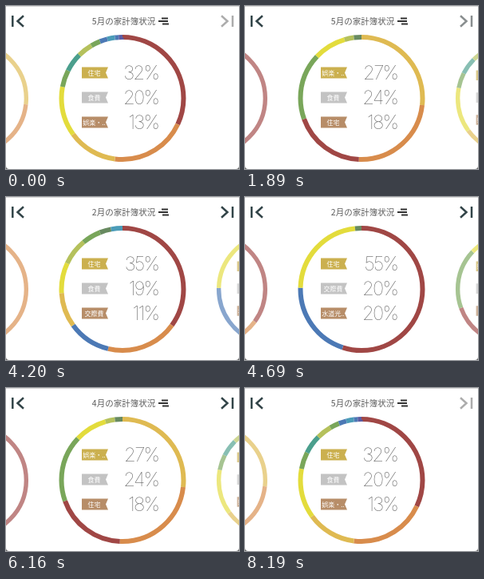
Recreate the animation shown at these times as an HTML page. Size 292 px wide and 204 px high, loop 8.61 s.

```html
<!DOCTYPE html>
<html lang="ja">
<head>
<meta charset="utf-8">
<title>家計簿状況</title>
<style>
  html, body { margin: 0; width: 100%; height: 100%; overflow: hidden; background: #fff; }
  svg { display: block; width: 100vw; height: 100vh; }
  .title { font: 400 10.5px "Noto Sans CJK JP", "Noto Sans CJK", sans-serif; fill: #5c5c5c; text-anchor: middle; }
  .tag { font: 400 8px "Noto Sans CJK JP", "Noto Sans CJK", sans-serif; fill: #fff; text-anchor: middle; }
  .pct { font: 100 24px Inter, sans-serif; letter-spacing: -1.8px; fill: #505050; text-anchor: end; }
  .line { fill: none; stroke-width: 2.5; }
</style>
</head>
<body>
<svg id="stage" viewBox="0 0 292 204" preserveAspectRatio="none"></svg>
<script>
const NS = 'http://www.w3.org/2000/svg';
const stage = document.getElementById('stage');
const LOOP = 8610, STEP = 70, MOVE = 400, GAP = 189.5;
const CX = 146, CY = 115.5, R = 76.5;
const DARK = [50, 68, 72], GREY = [172, 172, 172];

const C = {
  red: '#a04745', orange: '#d88c4c', gold: '#dfba52', yellow: '#e3dc3c', green: '#79a65a',
  teal: '#4b9f8d', lime: '#b5c15c', blue: '#4c79b5', sky: '#4b9cb8', moss: '#688a60', violet: '#5b5ca3'
};

// Each month: three top rows and ring segments as [colour, end percent].
const pages = [
  { rows: [], ring: [['orange', 60], ['red', 100]] },
  { rows: [['住宅', 35], ['食費', 19], ['交際費', 11]],
    ring: [['red', 35], ['orange', 53.8], ['blue', 65], ['gold', 74], ['yellow', 82], ['lime', 89],
           ['green', 94], ['moss', 97], ['sky', 100]] },
  { rows: [['住宅', 55], ['交際費', 20], ['水道光..', 20]],
    ring: [['red', 55], ['blue', 75.4], ['yellow', 98.3], ['moss', 100]] },
  { rows: [['娯楽・..', 27], ['食費', 24], ['住宅', 18]],
    ring: [['gold', 26.8], ['orange', 50.7], ['red', 69.5], ['green', 87], ['yellow', 95.5], ['lime', 98], ['moss', 100]] },
  { rows: [['住宅', 32], ['食費', 20], ['娯楽・..', 13]],
    ring: [['red', 32], ['orange', 52], ['gold', 65], ['yellow', 78], ['green', 82.5], ['teal', 87.5],
           ['lime', 91.5], ['green', 94], ['blue', 96], ['sky', 98], ['blue', 99], ['violet', 100]] }
];

// Start time and direction of every page turn.
const turns = [[960, -1], [1902, -1], [2902, -1], [4250, 1], [5158, 1], [6170, 1]];

function el(name, attrs, parent, text) {
  const node = document.createElementNS(NS, name);
  for (const key in attrs) node.setAttribute(key, attrs[key]);
  if (text !== undefined) node.textContent = text;
  parent.appendChild(node);
  return node;
}

function buildPage({ rows, ring }) {
  const g = el('g', {}, stage);
  let from = 0;
  for (const [color, to] of ring) {
    el('circle', {
      r: R, fill: 'none', stroke: C[color], 'stroke-width': 6, pathLength: 100,
      'stroke-dasharray': `${to - from} ${100 - to + from}`,
      'stroke-dashoffset': -from, transform: 'rotate(-90)'
    }, g);
    from = to;
  }
  rows.forEach(([label, value], i) => {
    const y = (i - 1) * 31 - 1;
    el('path', { d: `M-51 ${y - 7}h33l-3 7l3 7h-33z`, fill: ['#cbb04f', '#c3c3c3', '#b78d68'][i] }, g);
    el('text', { class: 'tag', x: -35.5, y: y + 3 }, g, label);
    el('text', { class: 'pct', x: 45, y: y + 8.5 }, g, value + '%');
  });
  return g;
}

const groups = pages.map(buildPage);
const title = el('text', { class: 'title', x: 147.5, y: 23 }, stage);
el('path', { d: 'M195 15.5h8M191 19h12M196 22.5h8', stroke: '#333', 'stroke-width': 2, fill: 'none' }, stage);
const left = el('path', { class: 'line', d: 'M8.3 12v14M22 12.3l-7.5 6.7l7.5 6.7' }, stage);
const right = el('path', { class: 'line', d: 'M284 12v14M270 12.3l7.5 6.7l-7.5 6.7' }, stage);
el('path', { d: 'M0 .5h292', stroke: '#d8d8d8' }, stage);
el('path', { d: 'M0 200q0 4 4 4h-4zM292 200q0 4-4 4h4z', fill: '#666' }, stage);

const clamp = v => Math.max(0, Math.min(1, v));
const ease = v => (1 - Math.cos(Math.PI * clamp(v))) / 2;
const mix = k => `rgb(${DARK.map((d, i) => Math.round(d + (GREY[i] - d) * k))})`;

function draw(t) {
  const press = { '-1': 0, '1': 0 };
  let pos = 4, month = 5;
  for (const [start, dir] of turns) {
    const k = (t - start) / MOVE;
    pos += dir * ease(k);
    if (t >= start + MOVE + 560) month += dir;
    if (k >= 0 && k < 1) press[dir] = clamp((0.68 - k) / 0.28);
  }
  groups.forEach((g, i) => {
    const off = i - pos, far = Math.min(1, Math.abs(off));
    g.setAttribute('transform', `translate(${CX + off * GAP} ${CY}) scale(${1 - 0.1 * far})`);
    g.setAttribute('opacity', 1 - 0.34 * far);
    g.style.display = Math.abs(off) < 1.6 ? '' : 'none';
  });
  title.textContent = month + '月の家計簿状況';
  title.setAttribute('opacity', 1 - 0.3 * Math.max(press[-1], press[1]));
  // The forward arrow is disabled on the latest month.
  const locked = 1 - clamp((t - 1850) / 140) + clamp((t - 7030) / 140);
  left.setAttribute('stroke', mix(press[-1]));
  right.setAttribute('stroke', mix(Math.max(press[1], locked)));
}

const begin = performance.now();
function tick() {
  const t = (performance.now() - begin) % LOOP;
  draw(Math.floor(t / STEP) * STEP);
  requestAnimationFrame(tick);
}
draw(0);
tick();
</script>
</body>
</html>
```
